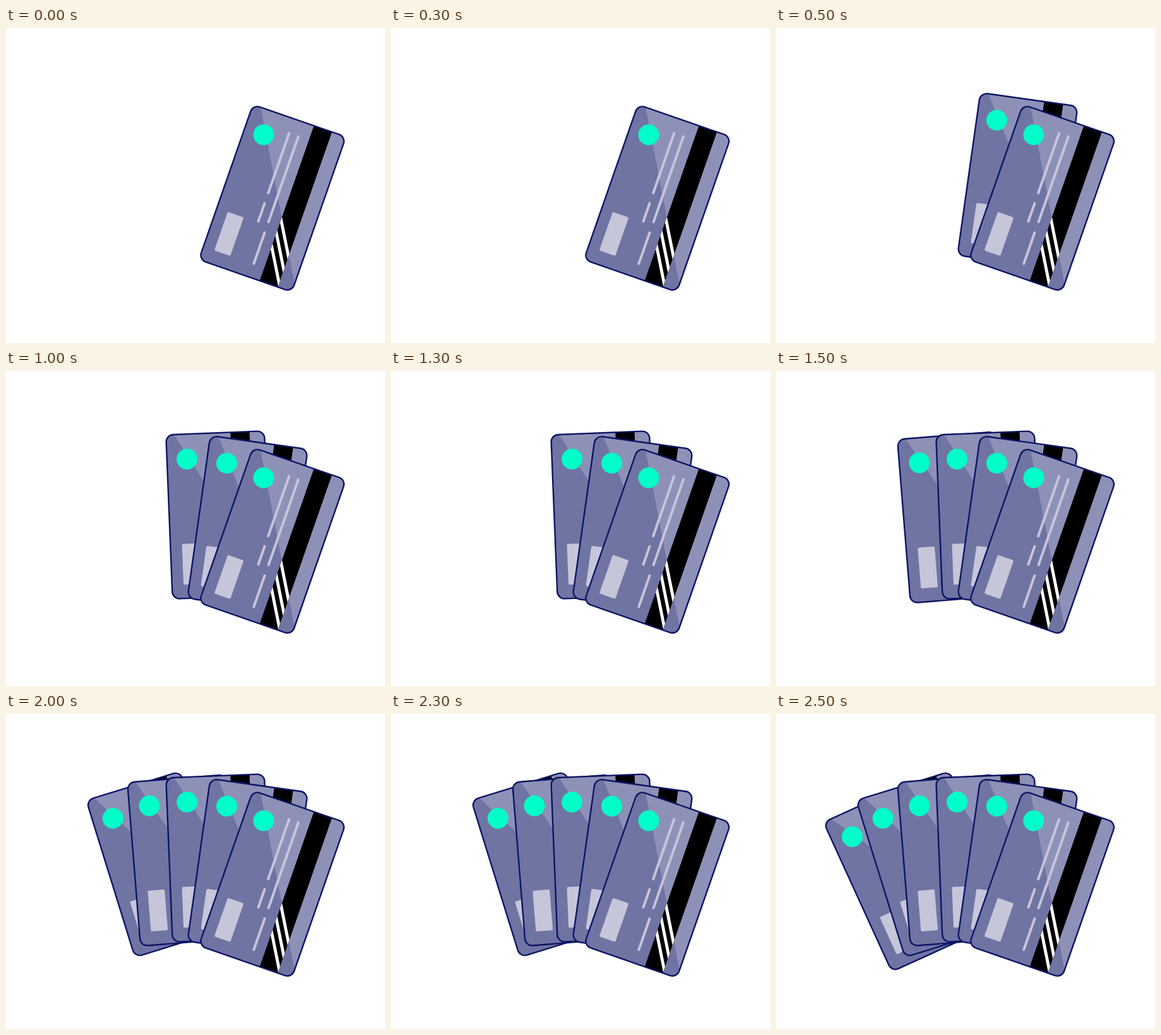
An HTML page for the animation above (3 s loop, 600x500 px).

```html
<!DOCTYPE html>
<html lang="en">
<head>
<meta charset="utf-8">
<title>Fan of cards</title>
<style>
  html, body { margin: 0; width: 100%; height: 100%; overflow: hidden; background: #fff; }
  svg { display: block; width: 600px; height: 500px; }

  /* each card pops in half a second after the one before it */
  .deal { animation: 3s step-end infinite; }
  .c2 { animation-name: deal2; }
  .c3 { animation-name: deal3; }
  .c4 { animation-name: deal4; }
  .c5 { animation-name: deal5; }
  .c6 { animation-name: deal6; }
  @keyframes deal2 { 0% { visibility: hidden; } 16.66%, 100% { visibility: visible; } }
  @keyframes deal3 { 0% { visibility: hidden; } 33.33%, 100% { visibility: visible; } }
  @keyframes deal4 { 0% { visibility: hidden; } 50%, 100% { visibility: visible; } }
  @keyframes deal5 { 0% { visibility: hidden; } 66.66%, 100% { visibility: visible; } }
  @keyframes deal6 { 0% { visibility: hidden; } 83.33%, 100% { visibility: visible; } }
</style>
</head>
<body>
<svg viewBox="0 0 600 500">
  <defs>
    <rect id="shape" x="-77.9" y="-130.3" width="155.8" height="260.6" rx="11.5"/>
    <clipPath id="edge"><use href="#shape"/></clipPath>
    <clipPath id="band"><rect x="24.2" y="-131" width="30.3" height="262"/></clipPath>

    <g id="card">
      <g clip-path="url(#edge)">
        <use href="#shape" fill="#7074a3"/>
        <path d="M-65.4-131H80V120.6Z" fill="#8e91b7"/>
        <rect x="24.2" y="-131" width="30.3" height="262"/>
        <path clip-path="url(#band)" stroke="#fff" stroke-width="4.8"
          d="M18 17.3l42 71M18 39.8l42 71M18 62.3l42 71"/>
      </g>
      <path stroke="#c5c6da" stroke-width="4" stroke-linecap="round"
        d="M-8.9-106V-5.6M6.6-106V37.5M-8.9 11.7V42M6.4 55.6V107.8"/>
      <rect x="-59.6" y="43.6" width="26.8" height="64.8" rx="2" fill="#c5c6da"/>
      <circle cx="-46.1" cy="-90.6" r="16.5" fill="#00ffc8"/>
      <use href="#shape" fill="none" stroke="#0c1565" stroke-width="2.4"/>
    </g>
  </defs>

  <use href="#card" class="deal c6" transform="translate(200.2 258.1) rotate(-24.5)"/>
  <use href="#card" class="deal c5" transform="translate(240.1 238.5) rotate(-17.2)"/>
  <use href="#card" class="deal c4" transform="translate(280.2 232.3) rotate(-4.6)"/>
  <use href="#card" class="deal c3" transform="translate(336.3 228.5) rotate(-2.3)"/>
  <use href="#card" class="deal c2" transform="translate(382.5 242.5) rotate(8)"/>
  <use href="#card" transform="translate(421.7 270.2) rotate(19.2)"/>
</svg>
</body>
</html>
```
